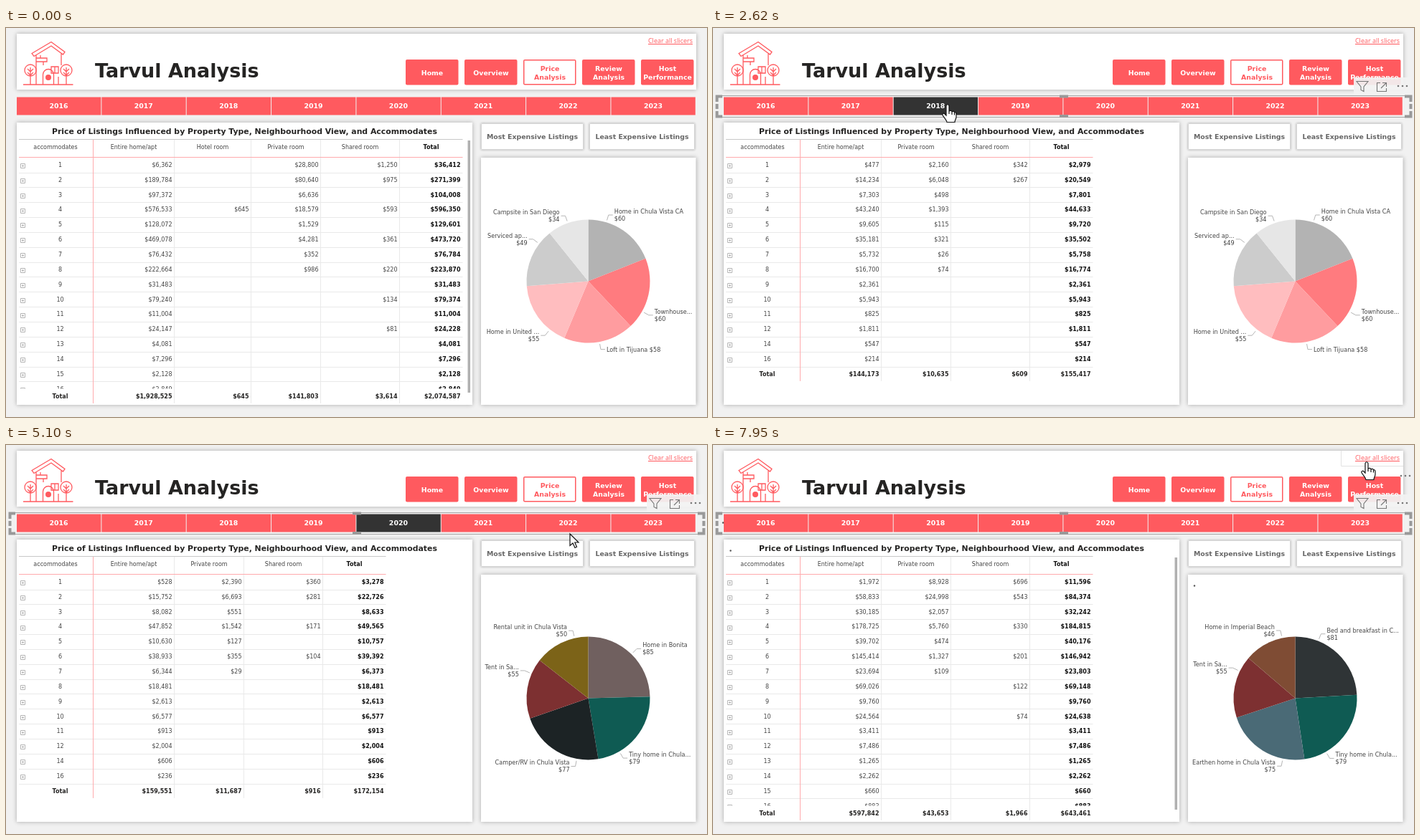
Animation, 977 px wide and 543 px high, one loop 8 s. Source, as an HTML page with a canvas:

```html
<!DOCTYPE html>
<html lang="en">
<head>
<meta charset="utf-8">
<title>Price analysis dashboard</title>
<style>
html, body { margin: 0; width: 100%; height: 100%; overflow: hidden; background: #f1f1f1; }
canvas { display: block; }
</style>
</head>
<body>
<canvas id="stage" width="977" height="543"></canvas>
<script>
const ctx = document.getElementById('stage').getContext('2d');
const LOOP = 8000, RED = '#ff5a5f', PINK = '#ffaaad', DARK = '#252423', GREY = '#444', LINE = '#e9e9e9';

// Prices follow smooth curves over the number of guests n; even group sizes are more common
function table(scale, privateMax, sharedMax, hotel) {
  const even = n => n % 2 === 0;
  const columns = [
    ['Entire home/apt', 113, n => scale * (1500 + 13700 * n ** 4.6 * Math.exp(-1.036 * n) * (even(n) ? 4.5 : 1))],
    ['Private room', 97, n => n <= privateMax ? scale * (even(n) ? 350000 : 60000) * .48 ** n : 0],
    ['Shared room', 110, n => n <= sharedMax && (n === 1 || even(n)) ? Math.sqrt(scale) * 1250 * .78 ** (n - 1) : 0]];
  if (hotel) columns.splice(1, 0, ['Hotel room', 107, n => n === 4 ? 645 : 0]);
  const guests = Array.from({ length: 16 }, (_, i) => i + 1).filter(n => scale > .1 || even(n) || n < 12);
  const cols = columns.map(([name, width, price]) => ({ name, width, values: guests.map(n => Math.round(price(n))) }));
  cols.push({ name: 'Total', width: 88, bold: true, values: guests.map((_, i) => cols.reduce((s, c) => s + c.values[i], 0)) });
  return { guests, cols };
}
const TABLES = {
  all: table(1, 8, 12, true), y2018: table(.075, 8, 2), y2020: table(.083, 7, 6), both: table(.31, 7, 10)
};
// Slices: label, price, colour, label direction in degrees
const PIES = {
  all: [['Home in Chula Vista CA', 60, '#b3b3b3', 17], ['Townhouse...', 60, '#ff7b7f', 119.3],
    ['Loft in Tijuana', 58, '#ff9c9f', 169.6], ['Home in United ...', 55, '#ffbdbf', 218.5],
    ['Serviced ap...', 49, '#cccccc', 307.4], ['Campsite in San Diego', 34, '#e6e6e6', 340.7]],
  y2020: [['Home in Bonita', 85, '#70605f', 44.4], ['Tiny home in Chula...', 79, '#0f5b53', 149.8],
    ['Camper/RV in Chula Vista', 77, '#1c2325', 190.7], ['Tent in Sa...', 55, '#7d3031', 293.5],
    ['Rental unit in Chula Vista', 50, '#7c6318', 347.2]],
  both: [['Bed and breakfast in C...', 81, '#2f3436', 21.8], ['Tiny home in Chula...', 79, '#0f5b53', 150.2],
    ['Earthen home in Chula Vista', 75, '#4a6a76', 191.6], ['Tent in Sa...', 55, '#7d3031', 296],
    ['Home in Imperial Beach', 46, '#7f4c34', 347.7]]
};

// Timeline
const MOVES = [ // start, end, x, y
  [120, 400, 520, 330], [530, 1160, 299, 109], [2440, 2620, 327, 107], [3290, 3770, 530, 113],
  [4820, 5100, 786, 124], [5360, 5570, 774, 112], [6580, 7340, 911, 24]];
const CLICKS = [[1350, 1550], [2820, 3040], [4030, 4290], [5770, 5970], [7540, 7680]];
const SELECTED = [[2018, 2090, 3210], [2020, 4290, 7880], [2022, 6190, 7880]];
const within = (t, a, b) => t >= a && t < b;

function cursorAt(t) {
  let x = 760, y = 570;
  for (const [start, end, toX, toY] of MOVES) {
    if (t < start) break;
    const steps = Math.round((end - start) / 70);
    const p = Math.min(1, Math.floor((t - start) / (end - start) * steps + .01) / steps);
    const e = (1 - Math.cos(Math.PI * p)) / 2;
    x += (toX - x) * e;
    y += (toY - y) * e;
  }
  return [x, y];
}

// Drawing helpers
function text(str, x, y, size, { bold, color = DARK, align = 'center', font = 'DejaVu Sans' } = {}) {
  ctx.font = `${bold ? 'bold ' : ''}${size}px "${font}", sans-serif`;
  ctx.textAlign = align;
  ctx.fillStyle = color;
  ctx.fillText(str, x, y + size * .36);
}
function rect(x, y, w, h, fill) { ctx.fillStyle = fill; ctx.fillRect(x, y, w, h); }
function path(d, stroke, width = 1, fill) {
  const p = new Path2D(d);
  if (fill) { ctx.fillStyle = fill; ctx.fill(p); }
  ctx.strokeStyle = stroke;
  ctx.lineWidth = width;
  ctx.stroke(p);
}
function disc(x, y, r, fill) { ctx.fillStyle = fill; ctx.beginPath(); ctx.arc(x, y, r, 0, 7); ctx.fill(); }
function card(x, y, w, h, blur = 6) {
  ctx.save();
  ctx.shadowColor = 'rgba(0,0,0,.3)';
  ctx.shadowBlur = blur;
  rect(x, y, w, h, '#fff');
  ctx.restore();
}
function at(x, y, draw) { ctx.save(); ctx.translate(x, y); draw(); ctx.restore(); }
const centred = (i, count) => i - (count - 1) / 2;

function house() {
  path('M36 35.5L63 19.5L82 33.5L79.5 37L63 25L39 39.5Z M42 38V79 M77 36V52 M24 79H93.5' +
    'M42 42H57V47H42 M48 42V38 M52 47V52 M63 63V54H73V63Z M68 54V63' +
    'M51.5 79V65A7.5 7.5 0 0 1 66.5 65V79 M73 68V79', RED, 1.3);
  for (const x of [34, 84]) at(x, 59, () =>
    path('M-8 0A8 8 0 0 1 8 0A8 8 0 0 1-8 0 M0-4V20 M-4-2L0 2L4-2 M-4 3L0 7L4 3', RED, 1.3));
  disc(59, 69, 4, RED);
}

function header() {
  card(15, 8, 947, 78);
  house();
  text('Tarvul Analysis', 124, 59.5, 27, { bold: true, align: 'left' });
  text('Clear all slicers', 957, 17.5, 9, { color: RED, align: 'right', font: 'Open Sans' });
  rect(895, 22, 62, 1, RED);
  ['Home', 'Overview', 'Price Analysis', 'Review Analysis', 'Host Performance'].forEach((name, i) => {
    const x = 557 + 82 * i, active = i === 2, lines = name.split(' ');
    ctx.beginPath();
    ctx.roundRect(x, 44, 73.5, 35.5, 2);
    ctx.fillStyle = RED;
    ctx.fill();
    if (active) rect(x + 1.5, 45.5, 70.5, 32.5, '#fff');
    lines.forEach((line, k) =>
      text(line, x + 37, 62.5 + centred(k, lines.length) * 12.4, 9.4, { bold: true, color: active ? RED : '#fff' }));
  });
}

function slicer(t, [cx, cy]) {
  const pitch = 118.35;
  for (let year = 2016; year < 2024; year++) {
    const x = 15 + pitch * (year - 2016);
    const on = SELECTED.some(([y, a, b]) => y === year && within(t, a, b));
    const hover = within(cy, 97, 122) && within(cx, x, x + pitch);
    rect(x, 96.5, pitch - 1, 25, on ? '#333' : hover ? '#e9e9e9' : RED);
    text(year, x + 58.5, 108.7, 9.4, { bold: true, color: hover && !on ? GREY : '#fff' });
  }
}

function dots(x, y) { for (let i = -1; i < 2; i++) disc(x + i * 6, y, 1.3, '#777'); }

function visualIcons() {
  rect(893, 69, 80, 24, 'rgba(243,243,243,.93)');
  path('M897 74.5H913L907 82V88.5L903 86.5V82Z M930 76.5H925.5V88.5H938.5V84 M933 76.5H938.5V82 M938.5 76.5L931 84', '#777', 1.1);
  dots(961, 81);
}

function selectionFrame() {
  path('M4 94.5H974 M4 124.5H974', '#a6a6a6');
  path('M13 95.5H5.5V103 M5.5 106V113 M5.5 116V123.5H13 M964 95.5H972.5V103 M972.5 106V113 M972.5 116V123.5H964' +
    'M483 95.5H495 M483 123H495', '#999', 4);
}

const dollars = n => '$' + n.toLocaleString('en-US');

function listingTable({ guests, cols }) {
  const PITCH = 20.85, TOP = 191, LEFT = 121.5;
  const scrolls = guests.length > 15, totalY = scrolls ? 514 : TOP + guests.length * PITCH;
  const bottom = totalY + 10, end = LEFT + cols.reduce((w, c) => w + c.width, 0);

  card(15, 132, 635, 394);
  text('Price of Listings Influenced by Property Type, Neighbourhood View, and Accommodates',
    64, 144.3, 10.87, { bold: true, align: 'left' });
  text('accommodates', 69, 166.5, 8, { color: GREY });
  text('Total', 75.5, totalY, 8, { bold: true });

  ctx.save();
  ctx.beginPath();
  ctx.rect(15, 150, 630, scrolls ? 353.5 : 370);
  ctx.clip();
  guests.forEach((n, i) => {
    const y = TOP + i * PITCH, iconY = Math.round(y) - 2;
    rect(18, Math.round(y + 10.5), end - 18, 1, LINE);
    path(`M20.5 ${iconY + .5}h6v6h-6z M22 ${iconY + 3.5}h3 M23.5 ${iconY + 2}v3`, '#b5b5b5');
    text(n, 75.5, y, 8, { color: GREY });
    let right = LEFT - 3;
    for (const { width, values, bold } of cols) {
      right += width;
      if (values[i]) text(dollars(values[i]), right, y, 8, { bold, align: 'right', color: bold ? '#111' : GREY });
    }
  });
  ctx.restore();

  let x = LEFT;
  for (const { name, width, values, bold } of cols) {
    text(name, x + width / 2, 166.5, 8, { bold, color: bold ? '#111' : GREY });
    x += width;
    text(dollars(values.reduce((a, b) => a + b)), x - 3, totalY, 8, { bold: true, align: 'right' });
    if (!bold) rect(Math.floor(x), 156, 1, bottom - 156, LINE);
  }
  rect(121, 156, 1, bottom - 156, PINK);
  rect(18, 155, end - 18, 1, '#c8c8c8');
  rect(18, 180, end - 18, 1, PINK);
  if (scrolls) path('M645.3 157V509', '#b0b0b0', 3.5);
}

function pie(slices) {
  const R = 86, ELBOW = 96.7, sum = slices.reduce((s, d) => s + d[1], 0);
  card(662, 181, 299.5, 345);
  at(811.5, 353.5, () => {
    let angle = -Math.PI / 2;
    for (const [label, price, color, degrees] of slices) {
      const next = angle + price / sum * 2 * Math.PI;
      ctx.beginPath();
      ctx.moveTo(0, 0);
      ctx.arc(0, 0, R, angle, next);
      ctx.fillStyle = color;
      ctx.fill();
      angle = next;

      const a = degrees * Math.PI / 180, sin = Math.sin(a), cos = Math.cos(a), side = Math.sign(sin);
      const x = ELBOW * sin, y = -ELBOW * cos;
      path(`M${x + 6 * side} ${y}H${x}L${(R + 3) * sin} ${-(R + 3) * cos}`, '#b5b5b5');
      const lines = label === 'Loft in Tijuana' ? [`${label} $${price}`] : [label, '$' + price];
      lines.forEach((line, i) => text(line, x + 8 * side, y + centred(i, lines.length) * 10, 8.15,
        { align: side > 0 ? 'left' : 'right', color: GREY }));
    }
  });
}

function buttons() {
  [['Most Expensive Listings', 662, 143], ['Least Expensive Listings', 813, 147]].forEach(([name, x, w]) => {
    card(x, 133, w, 37, 3);
    path(`M${x + .5} 133.5h${w - 1}v36h${1 - w}z`, '#d6d6d6');
    text(name, x + w / 2, 151.8, 9.4, { bold: true, color: '#666' });
  });
}

function pointer(t, [x, y]) {
  if (CLICKS.some(([a, b]) => within(t, a, b))) disc(x, y, 12, 'rgba(245,238,50,.8)');
  const hand = within(y, 96, 122) || y < 32;
  at(x, hand ? y + 1 : y, () => path(hand
    ? 'M-2 1C-2-2 2-2 2 1V8C3 7 6 7 6 9C7 8 9.5 8 9.5 10C10.5 9 12 10 12 12V16C12 19 10 20 10 23.5H-1C-1 21-6 16-7 13.5C-8 11.5-5 10.5-4 12L-2 14Z M6 9V13 M9.5 10.5V13.5 M2 8V12'
    : 'M0 0V16.5L4 13L7 19.5L9.5 18.3L6.8 12H12Z', '#111', 1.2, '#fff'));
}

const start = performance.now();
function frame() {
  const t = (performance.now() - start) % LOOP, cursor = cursorAt(t), [cx, cy] = cursor;
  const data = t < 2160 || within(t, 3360, 4430) ? 'all' : t < 3360 ? 'y2018' : t < 6190 ? 'y2020' : 'both';

  rect(0, 0, 977, 543, '#f1f1f1');
  header();
  slicer(t, cursor);
  listingTable(TABLES[data]);
  buttons();
  pie(PIES[data] || PIES.all);

  if (t >= 2020) selectionFrame();
  if (t >= 2020 || cy < 122) visualIcons();
  if (within(cy, 132, 526) && cx < 650) at(-311, 36, visualIcons);
  if (cy < 60) {
    path('M875.5 8V29.5H962', '#e2e2e2');
    dots(965, 43);
  }
  const loadingAll = within(t, 2020, 2090) || t >= 7950;
  if (loadingAll) disc(24.5, 147.5, 1.2, '#555');
  if (loadingAll || within(t, 6130, 6190)) disc(671, 196.5, 1.2, '#555');
  if (t >= 7950) disc(14, 108.5, 1.2, '#555');
  pointer(t, cursor);
  requestAnimationFrame(frame);
}
frame();
</script>
</body>
</html>
```
